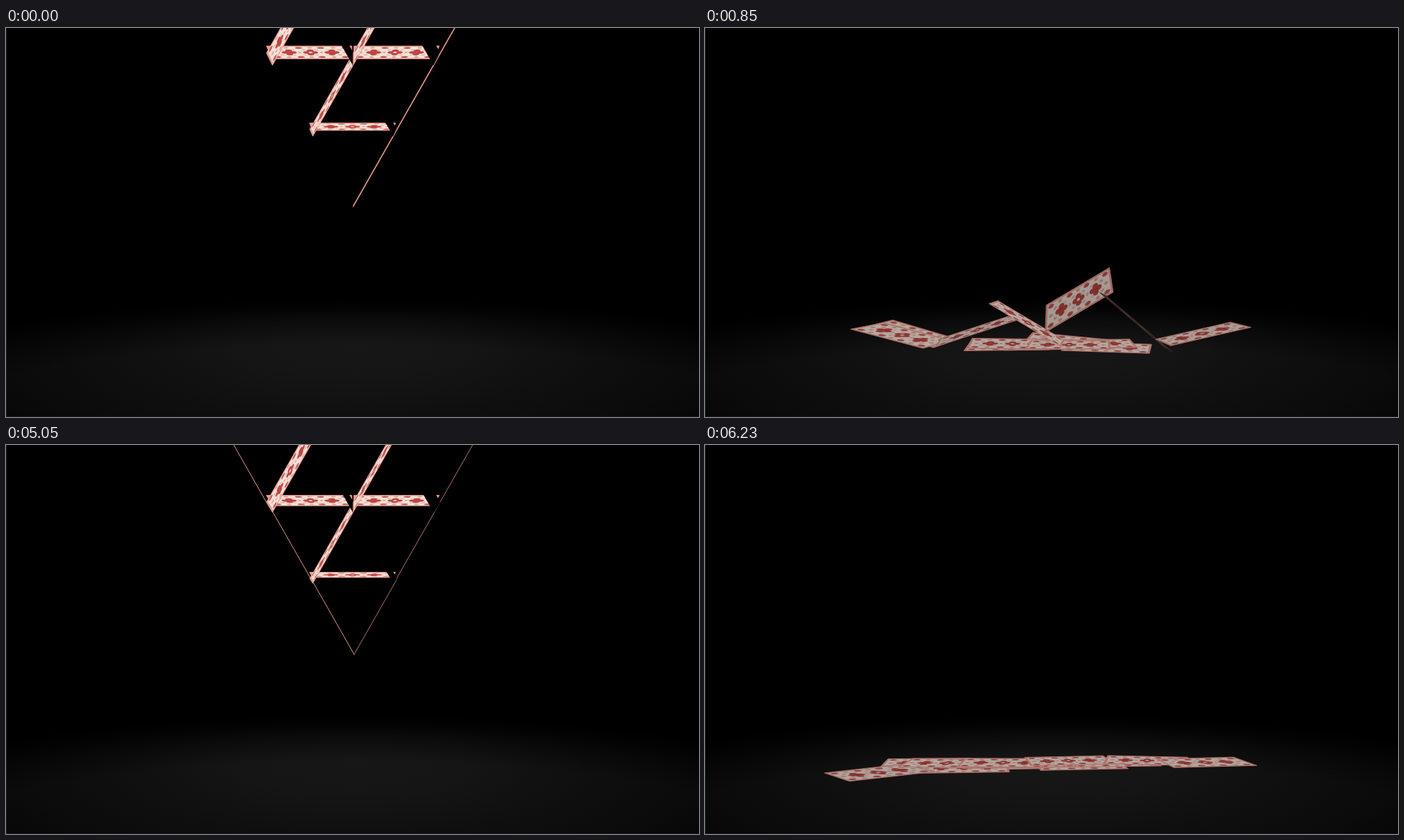
Animation of 998x561 px, one loop 9790 ms. Source, as an HTML page with a canvas:

```html
<!DOCTYPE html>
<html lang="en">
<head>
<meta charset="utf-8">
<title>Falling house of cards</title>
<style>
  html, body { margin: 0; width: 100%; height: 100%; overflow: hidden; background: #000; }
  #stage {
    position: relative; width: 998px; height: 561px; box-sizing: border-box;
    border-left: 1px solid #1a222c; border-bottom: 1px solid #12171d;
    background:
      radial-gradient(1000px 250px at 499px 640px, transparent 74%, rgba(0,0,0,.45) 87%, rgba(0,0,0,.85) 95%, #000 100%),
      radial-gradient(620px 200px at 499px 455px, #171717, #151515 25%, #0f0f0f 55%, #0b0b0b 80%, #060606);
  }
  canvas { position: absolute; left: -1px; top: 0; display: block; }
</style>
</head>
<body>
<div id="stage"><canvas id="view" width="998" height="561"></canvas></div>
<script>
const ctx = document.getElementById('view').getContext('2d');
const LOOP = 9790, HIT = 330;
const EYE = { x: 499, y: 290, depth: 1130 };
const FLOOR = 168, CARD_L = 121, CARD_W = 84, TAPER = 0.93;
const ORDER = [2, 0, 1, 3, 4, 5, 6, 7, 8, 9, 10, 11, 12, 13, 14];

// Collapsing poses: near edge x1, y1, x2, y2, then the offset to the far edge.
// Resting poses: x, depth, yaw in degrees.
const runs = [
  {
    start: 0, mid: 500, end: 1000, late: { 12: 1660, 13: 1250 }, drift: [],
    tumble: [
      [387, 464, 505, 461, 4, -12], [515, 462, 640, 466, 2, -13], [458, 437, 582, 460, 6, -21],
      [258, 403, 345, 461, 32, -12], [425, 466, 545, 460, 2, -12], [400, 463, 520, 463, 2, -12],
      [500, 461, 615, 460, 2, -12], [383, 459, 516, 462, -3, -17], [470, 463, 590, 462, 2, -12],
      [233, 405, 340, 462, 36, -10], [352, 453, 443, 372, 1, -9], [422, 329, 461, 438, 10, 1],
      [482, 434, 573, 368, 0, -42], [571, 357, 640, 466, -8, -4], [642, 453, 749, 396, -20, -4]
    ],
    rest: [
      [-70, -12, 0], [80, -32, 12], [28, -38, 10], [-225, 46, 20], [0, 0, 3],
      [-40, 10, 6], [62, 14, -6], [-60, 2, 2], [20, 8, 4], [-237, 30, 26],
      [-113, 15, -2], [-20, 12, 5], [100, 10, -4], [165, 22, -5], [245, 25, -9]
    ]
  },
  {
    start: 4890, mid: 580, end: 930, late: { 2: 1300, 4: 1340 }, drift: [7, 4, 0, 5],
    tumble: [
      [378, 465, 490, 468, 4, -16], [490, 470, 605, 461, 2, -13], [440, 468, 545, 461, -2, -14],
      [265, 451, 377, 466, -20, -26], [400, 466, 515, 465, 2, -14], [455, 465, 570, 463, 2, -13],
      [530, 466, 648, 459, -16, -12], [340, 388, 415, 452, 4, -5], [510, 433, 632, 463, -2, -31],
      [227, 447, 345, 459, -28, -32], [327, 342, 361, 455, 14, -12], [345, 357, 426, 464, 17, 0],
      [442, 466, 543, 386, -14, -15], [690, 445, 721, 458, 0, 0], [683, 464, 792, 460, 0, 0]
    ],
    rest: [
      [-120, -48, -5], [40, -22, -7], [-15, -14, -6], [-180, 0, -4], [-60, -8, -3],
      [5, 0, -4], [75, 8, -3], [-95, -5, -3], [90, 5, -5], [-229, -86, -38],
      [-150, -4, 4], [-70, 0, 2], [25, 20, -8], [140, 22, 8], [222, 4, -9]
    ]
  }
];

const clamp = x => Math.max(0, Math.min(1, x));
const mix = (a, b, p) => a + (b - a) * p;

function edgePose(x1, y1, x2, y2, wx, wy) {
  return {
    x: (x1 + x2) / 2, y: (y1 + y2) / 2,
    a: Math.atan2(y2 - y1, x2 - x1), len: Math.hypot(x2 - x1, y2 - y1), wx, wy
  };
}

// Upside-down house: single point below, three pairs on top.
function houseEdge(i, apex) {
  if (i === 2) return [437, apex - 119, 561, apex - 119];
  if (i === 7 || i === 8) {
    const x = i === 7 ? 375 : 501;
    return [x, apex - 230, x + 123, apex - 230];
  }
  const row = i < 2 ? 0 : i < 7 ? 1 : 2;
  const k = i - [0, 3, 9][row];
  const x = 500 - row * 62.5 + (k >> 1) * 125;
  const y = apex - row * 110;
  return [x, y, x + (k % 2 ? 62 : -62), y - 109];
}

function housePose(i, t, drift) {
  const fall = 184 * (t / 320) ** 2;
  const pose = edgePose(...houseEdge(i, 256 + fall), 0, 0);
  pose.x += (drift[i] || 0) * fall / 184;
  pose.wx = (EYE.x - pose.x) * (1 - TAPER);
  pose.wy = (EYE.y - pose.y) * (1 - TAPER);
  return pose;
}

function flatPose([x, z, yaw]) {
  const r = yaw * Math.PI / 180, c = Math.cos(r), s = Math.sin(r);
  const at = (u, v) => {
    const px = x + u * c + v * s, pz = z - u * s + v * c;
    const k = 1 / (1 + pz / EYE.depth);
    return [EYE.x + px * k, EYE.y + FLOOR * k];
  };
  const h = CARD_L / 2, w = CARD_W / 2;
  const n = at(0, -w), f = at(0, w);
  return edgePose(...at(-h, -w), ...at(h, -w), f[0] - n[0], f[1] - n[1]);
}

function blend(a, b, p) {
  const out = {};
  for (const key in a) out[key] = mix(a[key], b[key], p);
  let turn = b.a - a.a;
  turn -= Math.PI * Math.round(turn / Math.PI);
  out.a = a.a + turn * p;
  return out;
}

function poseAt(run, i, t) {
  if (t <= HIT) return housePose(i, t, run.drift);
  const tumble = edgePose(...run.tumble[i]);
  if (t <= run.mid) {
    return blend(housePose(i, HIT, run.drift), tumble, (t - HIT) / (run.mid - HIT));
  }
  const end = run.late[i] || run.end;
  return blend(tumble, flatPose(run.rest[i]), clamp((t - run.mid) / (end - run.mid)) ** 1.6);
}

// Back pattern as ellipses: u, v, radius u, radius v, tone, alpha.
const motifs = [];
function motif(u, v, ru, rv, tone, alpha) { motifs.push({ u, v, ru, rv, tone, alpha }); }
for (let i = 0; i < 13; i++) {
  for (let j = 0; j < 5; j++) {
    const u = 0.08 + i * 0.07, v = 0.14 + j * 0.18;
    if ((i + j) % 2 === 0) motif(u, v, 0.03, 0.06, 'red', 0.38);
  }
}
for (const u of [0.24, 0.5, 0.76]) {
  motif(u, 0.5, 0.12, 0.27, 'pale', 0.7);
  for (const [du, dv] of [[0.05, 0], [-0.05, 0], [0, 0.13], [0, -0.13]]) {
    motif(u + du, 0.5 + dv, 0.043, 0.1, 'red', 0.92);
  }
  motif(u, 0.5, 0.025, 0.055, u === 0.5 ? 'pale' : 'red', 0.9);
}
for (const v of [0.15, 0.85]) {
  for (const u of [0.08, 0.37, 0.63, 0.92]) motif(u, v, 0.045, 0.075, 'red', 0.75);
}
const tones = { pale: [244, 226, 216], red: [184, 58, 54], rim: [234, 156, 143] };

function shadeOf(p) {
  const ex = Math.cos(p.a), ey = Math.sin(p.a);
  const side = -p.wx * ey + p.wy * ex;
  const nx = -ey * Math.sign(side), ny = ex * Math.sign(side);
  const light = (1 - 0.26 * clamp((p.y - 230) / 220)) * (1 - 0.28 * Math.max(0, -nx));
  const dark = clamp(4 * Math.min(-nx, ny));
  const dim = 0.26 * clamp((p.y - 310) / 70);
  return { level: mix(light, dim, dark), width: Math.abs(side) };
}

function drawCard(p) {
  const { level, width } = shadeOf(p);
  const ink = (tone, alpha = 1) =>
    `rgba(${tones[tone].map(c => Math.round(c * level)).join()},${alpha})`;
  const ex = Math.cos(p.a) * p.len, ey = Math.sin(p.a) * p.len;
  const at = (u, v) => {
    const k = (u - 0.5) * mix(1, TAPER, v);
    return [p.x + ex * k + p.wx * v, p.y + ey * k + p.wy * v];
  };
  const trace = points => {
    ctx.beginPath();
    points.forEach(([u, v]) => ctx.lineTo(...at(u, v)));
    ctx.closePath();
  };
  const box = (du, dv) => trace([[du, dv], [1 - du, dv], [1 - du, 1 - dv], [du, 1 - dv]]);

  if (width < 0.6) {
    ctx.setLineDash(p.y > 459 ? [5, 14] : []);
    ctx.beginPath();
    ctx.moveTo(...at(0, 0));
    ctx.lineTo(...at(1, 0));
    ctx.strokeStyle = ink('rim');
    ctx.stroke();
    ctx.setLineDash([]);
    return;
  }
  box(0, 0);
  ctx.fillStyle = ink('rim');
  ctx.fill();
  if (width > 2) {
    box(0.025, 0.06);
    ctx.fillStyle = ink('pale');
    ctx.fill();
    for (const m of motifs) {
      const ring = [];
      for (let k = 0; k < 10; k++) {
        const r = k * Math.PI / 5;
        ring.push([m.u + m.ru * Math.cos(r), m.v + m.rv * Math.sin(r)]);
      }
      trace(ring);
      ctx.fillStyle = ink(m.tone, m.alpha);
      ctx.fill();
    }
  }
  box(0, 0);
  ctx.lineWidth = width < 2 ? 0.6 : 0.9;
  ctx.strokeStyle = ink('rim');
  ctx.stroke();
  ctx.lineWidth = 1;
}

function draw(time) {
  const run = time < runs[1].start ? runs[0] : runs[1];
  const t = time - run.start;
  ctx.clearRect(0, 0, 998, 561);
  ctx.lineJoin = 'bevel';
  for (const i of ORDER) drawCard(poseAt(run, i, t));
}

const begin = performance.now();
function tick() {
  draw((performance.now() - begin) % LOOP);
  requestAnimationFrame(tick);
}
tick();
</script>
</body>
</html>
```
